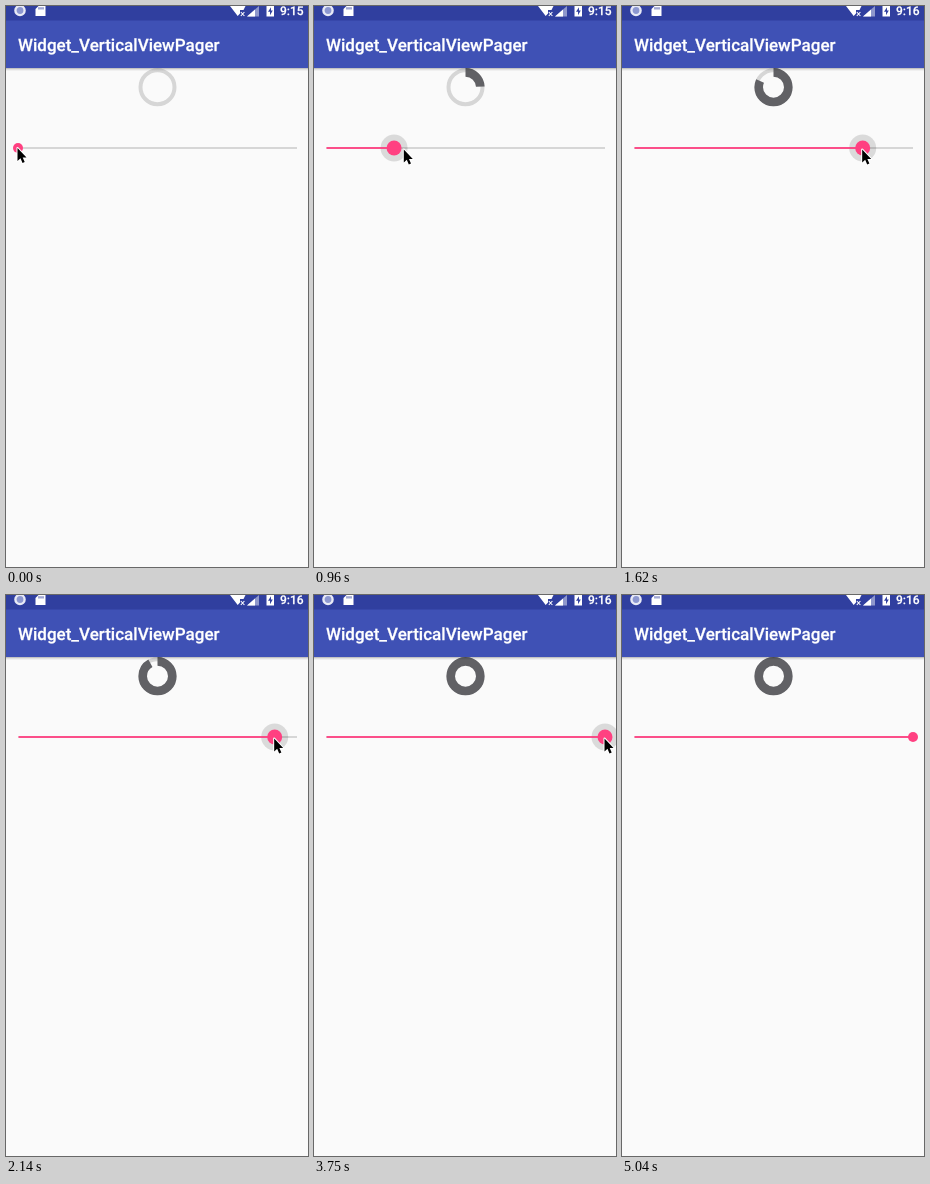
Animation, 302 px wide and 561 px high, one loop 5720 ms. Source, as an HTML page:

```html
<!DOCTYPE html>
<html lang="en">
<head>
<meta charset="utf-8">
<title>Seek bar and ring</title>
<style>
  html, body { margin: 0; width: 100%; height: 100%; overflow: hidden; background: #fafafa; }
  svg { display: block; width: 302px; height: 561px; }
  text {
    font-family: Roboto, sans-serif; font-weight: 500; fill: #fff;
    stroke: #fff; stroke-width: .25; text-rendering: geometricPrecision;
  }
</style>
</head>
<body>
<svg viewBox="0 0 302 561">
  <defs>
    <linearGradient id="shade" x2="0" y2="1">
      <stop offset="0" stop-color="#000" stop-opacity=".28"/>
      <stop offset=".5" stop-color="#000" stop-opacity=".07"/>
      <stop offset="1" stop-color="#000" stop-opacity="0"/>
    </linearGradient>
  </defs>
  <rect width="302" height="561" fill="#fafafa"/>

  <!-- progress ring -->
  <g fill="none" transform="translate(151.5 81.2) rotate(-90)">
    <circle r="17" stroke="#d6d6d6" stroke-width="4"/>
    <circle id="arc" r="14.8" stroke="#616165" stroke-width="8.6" pathLength="1"/>
  </g>

  <!-- bars -->
  <rect y="62" width="302" height="3.5" fill="url(#shade)"/>
  <rect width="302" height="62" fill="#3f51b5"/>
  <rect width="302" height="14.5" fill="#303f9f"/>
  <text x="12" y="45" font-size="17">Widget_VerticalViewPager</text>
  <text id="clock" x="274" y="9" font-size="12">9:15</text>

  <!-- status icons -->
  <circle cx="14" cy="4.5" r="4.6" fill="#8c97d0" stroke="#e8eaf6" stroke-width="2.4"/>
  <path d="M32.5 0H39.5V10H29.5V3Z" fill="#fff"/>
  <path d="M33 1.2v2.3M35 1.2v2.3M37 1.2v2.3" stroke="#303f9f" stroke-width=".9"/>
  <path d="M224 0H239.5L237.5 4H234V7.5L231.7 10Z" fill="#fff"/>
  <path d="M234.8 6l3.6 4M238.4 6l-3.6 4" stroke="#fff" stroke-width="1.1"/>
  <path d="M241 10.5L253 0V10.5Z" fill="#8f98cc"/>
  <path d="M241 10.5L249 3.5V10.5Z" fill="#fff"/>
  <path d="M260.5 0H268V10.5H260.5Z" fill="#fff"/>
  <path d="M265 1.2L262 5.8H264V9.2L266.8 4.6H265Z" fill="#303f9f"/>

  <!-- slider -->
  <circle id="halo" cy="142" r="13.5"/>
  <rect x="12.5" y="141.1" width="278.5" height="1.8" fill="#000" fill-opacity=".165"/>
  <rect id="fill" x="12.5" y="141.1" height="1.8" fill="#ff4081"/>
  <circle id="thumb" cy="142" fill="#ff4081"/>

  <path id="arrow" d="M0 0V13L3 10.3L5 15L7.2 14L5.2 9.4H9Z"
    stroke="#fff" stroke-width="2" stroke-linejoin="round" paint-order="stroke"/>
</svg>
<script>
const LOOP = 5720, LEFT = 12, SPAN = 279;
const $ = id => document.getElementById(id);

// Each drag runs evenly from start to end (ms) and leaves the slider at a share.
const drags = [
  [70, 640, .18], [640, 780, .244], [980, 1510, .47], [1510, 1622, .826],
  [1820, 2140, .92], [2500, 2610, .962], [2850, 2960, .98], [3340, 3460, 1],
];

const ramp = (t, from, to) => Math.min(1, Math.max(0, (t - from) / (to - from)));
const smooth = k => k * k * (3 - 2 * k);
const mix = (a, b, k) => a + (b - a) * k;

const share = t => drags.reduce((v, [from, to, end]) => mix(v, end, ramp(t, from, to)), 0);

// The pointer runs ahead of the thumb mid-way, then leaves through the bottom.
function pointer(t, x, v) {
  const lead = 12.5 * Math.max(0, Math.sin(Math.PI * v / .8)) - .5;
  const away = smooth(ramp(t, 4250, 4740)), out = ramp(t, 4950, 5030);
  const y = 142 + 1.5 * Math.min(1, 8 * v);
  return [mix(x + lead, 257, away), mix(y, 536.5, away) + 28 * out];
}

function set(id, attrs) {
  for (const key in attrs) $(id).setAttribute(key, attrs[key]);
}

function draw(t) {
  const v = share(t), x = LEFT + SPAN * v;
  const grow = ramp(t, 80, 190) - ramp(t, 3750, 3850);
  const glow = ramp(t, 80, 300) - ramp(t, 3750, 3990);
  set('arc', { 'stroke-dasharray': v + ' 2' });
  set('fill', { width: Math.max(0, x - 12.5) });
  set('thumb', { cx: x, r: 5 + 2.5 * grow });
  set('halo', { cx: x, 'fill-opacity': .125 * glow });
  set('arrow', { transform: `translate(${pointer(t, x, v).join(' ')})` });
  $('clock').textContent = t < 1100 ? '9:15' : '9:16';
}

let start;
function tick(now) {
  start ??= now;
  draw((now - start) % LOOP);
  requestAnimationFrame(tick);
}
draw(0);
requestAnimationFrame(tick);
</script>
</body>
</html>
```
